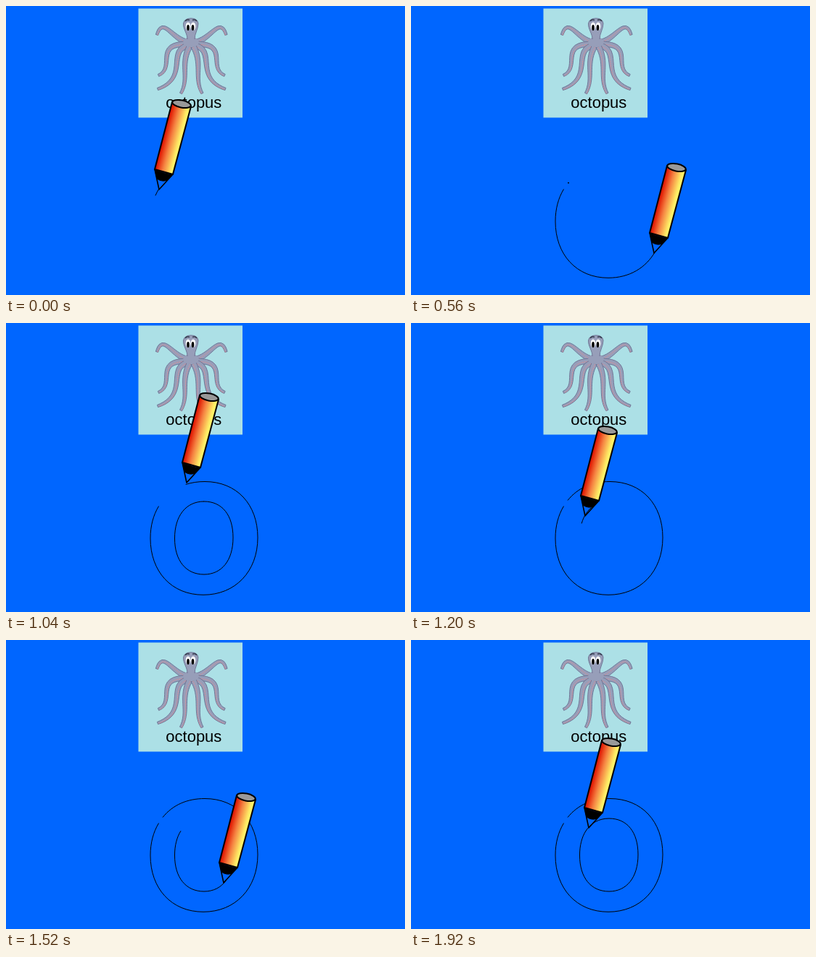
These frames come from a looping animation (550 by 400 pixels, 2 s). An HTML page:

```html
<!DOCTYPE html>
<html lang="en">
<head>
<meta charset="utf-8">
<title>Drawing the letter o</title>
<style>
html, body { margin: 0; width: 100%; height: 100%; overflow: hidden; background: #06f; }
svg { display: block; }
text { font: 22px "Liberation Sans", Arial, sans-serif; }
.line { fill: none; stroke: #000; stroke-width: 1; }
.skin { fill: #979eb9; stroke: #6a7090; stroke-width: .9; }
.suckers { fill: none; stroke: #d78f98; stroke-width: 1; stroke-dasharray: 2 1; }
</style>
</head>
<body>
<svg width="550" height="400" viewBox="0 0 550 400">
  <defs>
    <linearGradient id="paint" gradientUnits="userSpaceOnUse" x1="-6" y1="-28" x2="18.5" y2="-21.7">
      <stop offset="0.05" stop-color="#e01400"/>
      <stop offset="0.45" stop-color="#f58242"/>
      <stop offset="0.9" stop-color="#fff066"/>
    </linearGradient>
  </defs>
  <rect width="550" height="400" fill="#06f"/>
  <rect x="182.5" y="3.5" width="143.5" height="151" fill="#ace0e6"/>
  <g id="arms"></g>
  <ellipse cx="255" cy="50" rx="11" ry="7" fill="#979eb9"/>
  <path class="skin" d="M250 46C250 38 244 32 244.5 24Q246 17 255 17Q264 17 265 24C265 32 260 38 260 46"/>
  <path d="M247 21q2-3 6-1.5M257 19.5q4-1.5 6 1.5" fill="none" stroke="#333a4d" stroke-width="1.5"/>
  <g fill="#fff"><ellipse cx="251" cy="28" rx="3.3" ry="5.5"/><ellipse cx="258" cy="28" rx="3.3" ry="5.5"/></g>
  <ellipse cx="251" cy="30" rx="1.8" ry="4"/><ellipse cx="257.5" cy="30" rx="1.8" ry="4"/>
  <text x="220.3" y="141">octopus</text>

  <path id="outer" class="line" d="M210.5 253.5C203 266 199 281 199 298C199 344 228 376.3 272 376.3C316 376.3 347 344 347 297C347 251 318 219.5 274 219.5C250 219.5 230 228 216 245.5"/>
  <path id="inner" class="line"/>
  <rect id="dot" width="2" height="1.5"/>

  <g id="pencil" stroke="#000" stroke-width="2" stroke-linejoin="round">
    <path d="M18-121L-6-28L19-21L44-115Z" fill="url(#paint)"/>
    <ellipse cx="31" cy="-118.5" rx="13" ry="5" transform="rotate(11 31 -118.5)" fill="#999"/>
    <path d="M-6-28L0 0L19-21" fill="none" stroke-width="1.6"/>
    <path d="M-6-28Q6-22 19-21L11.5-13Q4-10-3-15Z" stroke-width="1"/>
  </g>
</svg>
<script>
const STEP = 80, COUNT = 25;
const tips = [
  [211, 254], [203, 283], [207, 314], [222, 345], [246, 367],
  [277, 371], [309, 362], [335, 342], [346, 316], [349, 284],
  [341, 254], [320, 232], [285, 220], [249, 221], [220, 238],
  [240, 267], [235, 301], [245, 330], [270, 346], [300, 336],
  [313, 309], [314, 278], [298, 254], [268, 246], [245, 260]
];
const dots = { 7: [216, 244], 21: [275, 246.5] };
const el = id => document.getElementById(id);

// The loop runs twice, so a stroke can pass its own start.
const loop = "C248 247 232.5 267 232.5 298C232.5 329 248 348 273 348" +
  "C297 348 313 329 313 297C313 266 298 247 273 247";
el("inner").setAttribute("d", "M273 247" + loop + loop);
const loopLength = el("inner").getTotalLength() / 2;

function add(parent, d, name) {
  const path = document.createElementNS("http://www.w3.org/2000/svg", "path");
  path.setAttribute("d", d);
  path.setAttribute("class", name);
  parent.append(path);
  return path;
}

// Tapered arm around a curve, with a row of suckers along it.
function arm(parent, curve) {
  const guide = add(parent, curve, "suckers");
  const length = guide.getTotalLength(), left = [], right = [], n = 16;
  for (let i = 0; i <= n; i++) {
    const s = length * i / n;
    const p = guide.getPointAtLength(s);
    const a = guide.getPointAtLength(Math.max(0, s - 1));
    const b = guide.getPointAtLength(Math.min(length, s + 1));
    const angle = Math.atan2(b.y - a.y, b.x - a.x), w = 3.9 - 2.2 * i / n;
    const dx = -Math.sin(angle) * w, dy = Math.cos(angle) * w;
    left.push([p.x + dx, p.y + dy]);
    right.unshift([p.x - dx, p.y - dy]);
  }
  const shape = add(parent, "M" + left.concat(right).join("L") + "Z", "skin");
  parent.insertBefore(shape, guide);
  guide.setAttribute("transform", "translate(1 .5)");
}

const curves = [
  "M249 50C228 44 216 14 208 40",
  "M248 53C204 52 234 86 210 96",
  "M250 55C222 62 252 100 209 115",
  "M253 56C240 80 253 100 241 121"
];
for (const mirrored of [false, true]) {
  const side = document.createElementNS("http://www.w3.org/2000/svg", "g");
  if (mirrored) side.setAttribute("transform", "translate(511.5 0) scale(-1 1)");
  el("arms").append(side);
  curves.forEach(curve => arm(side, curve));
}

function reveal(path, start, end) {
  path.style.display = end > start ? "" : "none";
  path.style.strokeDasharray = `0 ${start} ${Math.max(0, end - start)} 2000`;
}

function innerRange(n) {
  if (n < 12) return [0, 0];
  if (n < 15) return [0, loopLength];
  const start = n < 19 ? 23 : 38;
  return [start, Math.min(117 + 32.25 * (n - 17), start + loopLength)];
}

function draw(n) {
  reveal(el("outer"), 0, n < 4 ? 10 + 35 * n : n < 14 ? 149 + 31.8 * (n - 4) : 1000);
  reveal(el("inner"), ...innerRange(n));
  const dot = dots[n];
  el("dot").style.display = dot ? "" : "none";
  if (dot) el("dot").setAttribute("transform", `translate(${dot})`);
  el("pencil").setAttribute("transform", `translate(${tips[n]})`);
}

const began = performance.now();
function tick() {
  draw(Math.floor((performance.now() - began) / STEP) % COUNT);
  requestAnimationFrame(tick);
}
tick();
</script>
</body>
</html>
```
